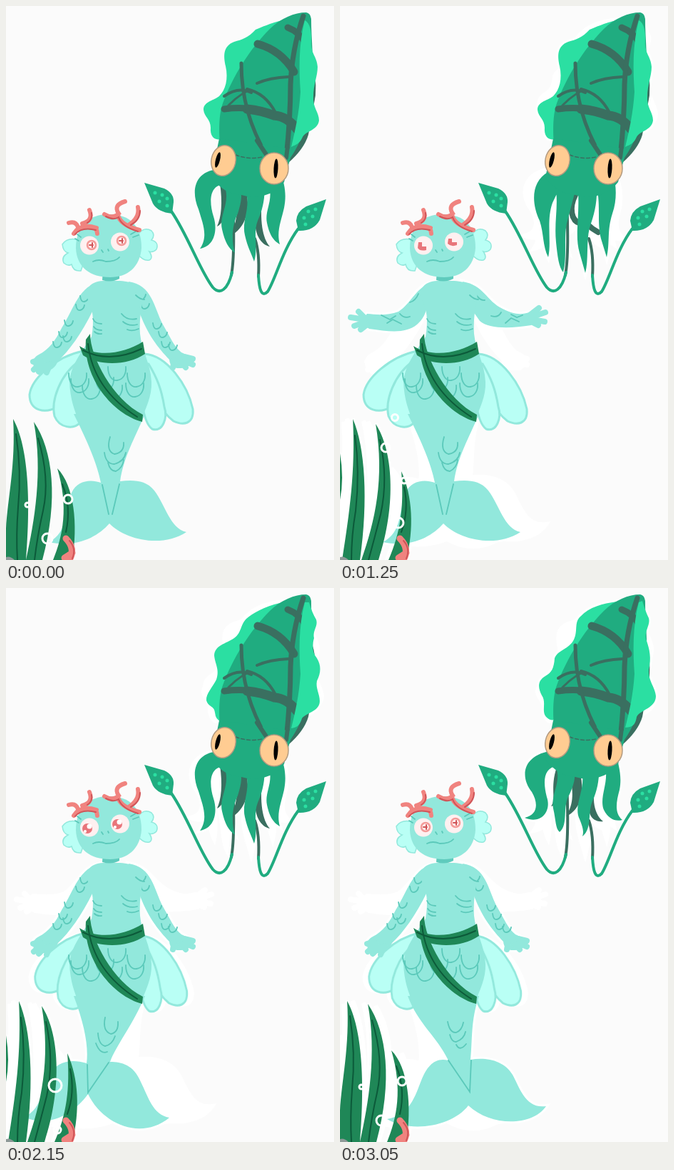
An HTML page without scripts for the animation above (3.1 s loop, 460 px wide and 774 px high).

```html
<!DOCTYPE html>
<html lang="en">
<head>
<meta charset="utf-8">
<title>Mermaid and squid</title>
<style>
html, body { margin: 0; width: 100%; height: 100%; overflow: hidden; background: #fbfbfb; }
svg { display: block; width: 460px; height: 774px; }
.skin { fill: #92e8dc; }
.film { fill: #b9fff5; stroke: #92e8dc; stroke-width: 3; }
.ear { fill: #b9fff5; stroke: #92e8dc; stroke-width: 1.5; }
.line { fill: none; stroke: #5bc9ba; stroke-width: 1.8; stroke-linecap: round; }
.finger { fill: none; stroke: #92e8dc; stroke-width: 8; stroke-linecap: round; }
.coral { fill: none; stroke: #f0837f; stroke-width: 6; stroke-linecap: round; }
.stalk { stroke-width: 9; }
.vein { fill: none; stroke: #d05558; stroke-width: 2; stroke-linecap: round; }
.weed { fill: #1f8757; }
.rib { fill: none; stroke: #0c5a3a; stroke-width: 2; stroke-linecap: round; }
.squid { fill: #20ac80; }
.frill { fill: #2bdfa2; }
.deep { fill: #3a6f60; }
.band { fill: none; stroke: #3a6f60; stroke-linecap: round; }
.ring { fill: none; stroke: #fff; stroke-width: 3; }

/* three cycles per loop; quick parts run twice per cycle */
.c { animation: calc(3.1s / 3) step-end infinite; }
.q { animation: calc(3.1s / 6) step-end infinite; }
.ghost { filter: brightness(0) invert(1); animation: trail 3.1s step-end infinite; }
@keyframes trail { 0% { opacity: 0 } 1.6% { opacity: 1 } }

.armDown { animation-name: armDown } .armUp { animation-name: armUp }
@keyframes armDown { 0%, 79% { opacity: 1 } 31% { opacity: 0 } }
@keyframes armUp { 0%, 79% { opacity: 0 } 31% { opacity: 1 } }

.legMid { animation-name: legMid } .legHang { animation-name: legHang } .legCurl { animation-name: legCurl }
@keyframes legMid { 0%, 55%, 97% { opacity: 1 } 29%, 80% { opacity: 0 } }
@keyframes legHang { 0%, 55% { opacity: 0 } 29% { opacity: 1 } }
@keyframes legCurl { 0%, 97% { opacity: 0 } 80% { opacity: 1 } }

.finA { animation-name: finA } .finB { animation-name: finB } .finC { animation-name: finC }
@keyframes finA { 0%, 13%, 46%, 78%, 98% { opacity: 1 } 4%, 36%, 62%, 86% { opacity: 0 } }
@keyframes finB { 0%, 78%, 98% { opacity: 0 } 62%, 86% { opacity: 1 } }
@keyframes finC { 0%, 13%, 46% { opacity: 0 } 4%, 36% { opacity: 1 } }

.weedMid { animation-name: weedMid } .weedLeft { animation-name: weedLeft } .weedRight { animation-name: weedRight }
@keyframes weedMid { 0%, 27%, 80% { opacity: 1 } 5%, 48% { opacity: 0 } }
@keyframes weedLeft { 0%, 80% { opacity: 0 } 48% { opacity: 1 } }
@keyframes weedRight { 0%, 27% { opacity: 0 } 5% { opacity: 1 } }

.tailMid { animation-name: tailMid } .tailRight { animation-name: tailRight } .tailLeft { animation-name: tailLeft }
@keyframes tailMid { 0%, 14%, 64%, 98% { opacity: 1 } 5%, 40%, 84% { opacity: 0 } }
@keyframes tailRight { 0%, 64%, 98% { opacity: 0 } 40%, 84% { opacity: 1 } }
@keyframes tailLeft { 0%, 14% { opacity: 0 } 5% { opacity: 1 } }

.hips { animation-name: hips }
@keyframes hips {
  0%, 14%, 38%, 60%, 78%, 98% { transform: none }
  4%, 27%, 48%, 68%, 88% { transform: translate(10px, 0) scale(.93, 1) }
}

.bubA { animation-name: bubA } .bubB { animation-name: bubB } .bubC { animation-name: bubC } .bubD { animation-name: bubD }
@keyframes bubA { 0%, 27%, 80% { opacity: 1 } 5%, 45% { opacity: 0 } }
@keyframes bubB { 0%, 14% { opacity: 0 } 5% { opacity: 1 } }
@keyframes bubC { 0%, 27%, 80% { opacity: 0 } 14%, 62% { opacity: 1 } }
@keyframes bubD { 0%, 62% { opacity: 0 } 45% { opacity: 1 } }

.eyeSoft { animation-name: eyeSoft } .eyeSide { animation-name: eyeSide } .eyeFull { animation-name: eyeFull }
@keyframes eyeSoft { 0%, 82% { opacity: 1 } 4% { opacity: 0 } }
@keyframes eyeSide { 0%, 27%, 82% { opacity: 0 } 15%, 62% { opacity: 1 } }
@keyframes eyeFull { 0%, 15%, 62% { opacity: 0 } 4%, 27% { opacity: 1 } }
</style>
</head>
<body>
<svg viewBox="0 0 460 774" xmlns="http://www.w3.org/2000/svg">
<defs>
  <path id="scale" class="line" d="M-13 0C-13 13-7 20 0 19 8 18 13 10 12 0"/>
  <path id="nick" class="line" d="M-6-3Q-5 6 0 5 5 4 6-2"/>

  <!-- squid side fins -->
  <g id="finA" class="frill">
    <path d="M388 20C370 24 358 30 350 33 340 44 331 47 320 50 304 56 305 70 308 84 312 102 308 117 299 126 289 133 277 134 277 145 278 155 287 158 287 170 286 182 292 188 301 186L350 100Z"/>
  </g>
  <g id="finB" class="frill">
    <path d="M388 19C368 22 350 26 337 40 328 48 334 60 328 72 321 86 306 86 301 98 300 112 297 118 288 123 276 130 278 140 283 150 290 160 282 172 289 180Q295 186 301 184L350 100Z"/>
  </g>
  <g id="finC" class="frill">
    <path d="M384 21C362 26 345 36 337 43 328 52 331 62 320 70 308 78 293 80 292 94 293 106 300 114 295 128 290 138 280 148 281 157 284 167 292 164 293 174Q294 184 301 186L350 100Z"/>
  </g>
  <path id="sideA" class="frill" d="M419 20C410 55 411 90 413 120 411 150 406 172 400 197 408 193 412 192 416 183 421 174 437 174 439 160 439 148 430 142 431 127 431 110 437 98 437 85 436 70 427 66 428 50Q429 25 419 20Z"/>
  <path id="sideB" class="frill" d="M419 20C410 55 411 90 413 120 411 150 406 172 400 195 408 194 414 194 416 180 421 170 443 168 443 151 442 138 432 130 433 114 437 98 434 85 430 74 425 62 436 52 433 42Q428 32 424 18Z"/>
  <path id="sideC" class="frill" d="M419 20C410 55 411 90 413 120 411 150 406 172 400 196 408 195 412 192 415 182 422 174 440 172 440 158 440 148 434 140 436 130 442 118 442 108 436 98 428 88 430 78 432 70 430 58 438 54 435 44Q429 34 425 20Z"/>

  <!-- squid arms -->
  <g id="legMid">
    <path class="deep" d="M300 248C304 275 302 295 296 308 309 302 314 275 316 255ZM322 260C327 290 322 304 315 321 336 310 343 285 337 260ZM360 262C355 300 360 325 370 336 358 334 346 318 350 290Z"/>
    <path class="squid" d="M302 228C266 228 258 256 270 284 276 304 284 322 272 339 293 336 297 312 291 294 284 272 286 250 306 249ZM306 250C316 275 298 292 303 312 307 330 312 338 321 345 315 324 318 305 325 290 330 275 331 265 329 258ZM336 258C344 282 330 300 335 320 339 338 344 345 348 357 354 338 346 318 353 300 360 284 364 268 362 248ZM366 246C378 268 362 285 366 303 370 322 376 328 384 333 379 315 386 300 390 282 394 262 390 248 386 235Z"/>
  </g>
  <g id="legHang">
    <path class="band" stroke-width="8" d="M330 264C321 282 324 300 337 304M347 305Q354 312 362 316"/>
    <path class="squid" d="M292 232C268 245 268 275 280 300 286 318 284 335 292 351 297 330 289 300 298 275L310 250ZM302 250C307 280 300 300 303 330 305 350 307 365 313 372 319 350 313 320 319 300L330 258ZM334 256C336 300 329 320 336 345L344 373C349 355 345 330 350 310 357 290 361 275 360 250ZM360 250C366 285 360 300 366 325L374 351C379 330 374 315 382 290 389 270 387 250 384 238Z"/>
  </g>
  <g id="legCurl">
    <path class="deep" d="M304 250C294 280 304 295 296 305 310 302 314 275 316 255ZM322 260C329 290 326 304 317 319 338 310 343 285 337 260ZM362 265C350 295 358 318 369 326 352 328 344 312 352 290Z"/>
    <path class="squid" d="M300 227C257 232 251 262 269 285 278 300 278 317 259 321 282 331 297 312 290 292 284 268 286 252 305 248ZM302 248C312 270 295 288 299 308 303 325 302 336 308 341 321 330 311 305 322 288 328 275 330 265 329 258ZM338 252C347 279 326 303 336 323 341 335 342 341 340 347 354 336 347 314 354 298 362 280 364 265 363 245ZM368 242C382 265 362 290 370 310 376 322 386 327 396 324 385 315 387 300 392 282 396 262 390 246 388 235Z"/>
  </g>
  <path id="head" class="squid" d="M299 185L402 200 390 246C375 266 350 270 330 264 312 263 300 254 288 240Z"/>

  <!-- mermaid hip fins -->
  <g id="hips" class="film">
    <path d="M108 482C70 490 36 520 33 543 33 566 55 570 72 560L98 520Z"/>
    <path d="M104 495C75 515 63 552 68 573 75 590 95 592 104 582L112 520Z"/>
    <path d="M194 486C226 488 255 530 262 563 264 585 248 586 235 580 215 565 198 530 194 500Z"/>
    <path d="M188 500C189 540 190 580 205 591 220 596 227 575 222 560 218 535 212 520 200 500Z"/>
  </g>

  <!-- tails -->
  <g id="tailMid">
    <path class="skin" d="M95 570C115 610 128 640 133 666 118 661 100 663 92 680 82 705 88 735 60 749 100 757 128 742 145 723 166 745 218 758 253 735 230 730 224 698 208 677 196 662 178 662 160 664 165 630 180 605 195 570Z"/>
    <path class="line" d="M135 669L144 710M159 668L149 710M146 602Q140 622 152 626 166 624 165 610M138 624Q140 640 152 640 166 636 168 624M143 638Q146 650 154 650 164 645 165 634"/>
  </g>
  <g id="tailRight">
    <path class="skin" d="M95 570C110 610 135 625 152 660 133 655 122 668 114 688 106 708 98 737 66 742 100 762 158 752 180 723 212 753 270 752 289 724 260 728 252 698 242 680 230 660 205 655 183 659 186 630 183 605 195 570Z"/>
    <path class="line" d="M152 660L182 704 184 660M151 606Q154 622 163 621 171 618 173 607M154 624Q157 635 163 634 174 630 176 620M163 638Q168 648 177 637"/>
  </g>
  <g id="tailLeft">
    <path class="skin" d="M95 570C110 610 116 640 113 664 90 657 70 662 60 682 50 705 48 730 25 739 60 755 95 735 115 707 136 750 190 772 229 740 206 736 200 712 189 690 179 666 162 662 146 662 154 640 178 610 195 570Z"/>
    <path class="line" d="M114 666L115 705 144 663M139 600Q135 619 147 623 158 621 157 606M129 622Q130 638 139 640 149 638 153 626M126 636Q132 652 142 648"/>
  </g>

  <!-- mermaid arms -->
  <g id="armDown">
    <path class="skin" d="M134 385C102 390 96 422 78 450 69 468 60 480 46 487 34 493 37 506 45 509 60 512 68 508 73 496 88 482 106 458 122 425Z"/>
    <path class="finger" d="M48 494L38 497M50 498L39 508M55 502L46 511M62 500L57 512"/>
    <path class="skin" d="M172 385C205 390 207 420 220 445 231 464 236 476 246 484 262 490 262 500 253 505 238 508 230 505 229 494 214 478 198 460 185 422Z"/>
    <path class="finger" d="M250 490L262 493M250 496L262 501M246 498L252 505M236 494L234 505"/>
    <use href="#nick" x="110" y="408"/><use href="#nick" x="104" y="420"/><use href="#nick" x="88" y="442"/><use href="#nick" x="80" y="458"/><use href="#nick" x="72" y="472"/><use href="#nick" x="86" y="464"/>
    <use href="#nick" x="190" y="405"/><use href="#nick" x="195" y="418"/><use href="#nick" x="212" y="446"/><use href="#nick" x="220" y="458"/><use href="#nick" x="224" y="472"/><use href="#nick" x="234" y="476"/>
  </g>
  <g id="armUp">
    <path class="skin" d="M134 385C107 390 101 415 82 427 66 433 50 431 38 430L27 442 41 451C70 455 92 458 108 445 116 438 121 430 124 412Z"/>
    <path class="finger" d="M36 437L26 427M34 438L15 435M34 442L20 447M38 445L29 452"/>
    <path class="skin" d="M172 385C202 390 205 412 228 423 245 432 255 431 266 428L278 436 268 446C238 451 208 451 196 440L182 420Z"/>
    <path class="finger" d="M266 432L279 422M270 434L288 428M270 438L287 441M266 440L278 446"/>
    <path class="line" d="M58 432L70 438 78 433M66 443L74 438 86 444M84 430Q90 437 98 434M110 402Q106 412 98 414M190 402Q196 412 203 411M226 428Q222 436 212 433M232 443L240 436 251 441M240 431L248 435 256 432"/>
  </g>

  <!-- weeds -->
  <g id="weedMid">
    <path class="weed" d="M10 577C26 605 37 665 28 774H0V730C2 690 14 640 10 577ZM39 581C66 620 74 690 51 774H28C40 720 52 650 39 581ZM72 646C96 670 101 725 93 774H66C80 740 88 700 72 646Z"/>
    <path class="rib" d="M14 598Q22 650 17 700 14 740 16 774M45 604Q62 660 52 705 44 740 40 774M79 668Q92 700 84 735"/>
  </g>
  <g id="weedLeft">
    <path class="weed" d="M5 581C20 625 30 690 27 774H2C2 710 9 650 5 581ZM33 580C68 625 76 690 54 774H28C41 710 48 645 33 580ZM87 650C102 685 104 730 94 774H68C86 735 91 700 87 650Z"/>
    <path class="rib" d="M8 606Q16 660 12 774M40 604Q56 660 50 705 44 740 40 774M91 672Q97 705 88 735"/>
  </g>
  <g id="weedRight">
    <path class="weed" d="M18 577C35 615 40 690 28 774H3C13 710 22 650 18 577ZM50 584C74 620 80 695 54 774H30C49 720 63 660 50 584ZM86 650C102 685 104 730 93 774H68C85 735 90 700 86 650ZM0 625Q6 660 0 690Z"/>
    <path class="rib" d="M21 600Q28 650 22 705 16 740 16 774M56 606Q68 660 57 710 48 745 40 774M90 672Q97 705 86 735"/>
  </g>
</defs>

<g class="ghost" stroke="#fff" stroke-width="6">
  <use href="#finA"/><use href="#finB"/><use href="#sideA"/><use href="#sideB"/>
  <use href="#legMid"/><use href="#legHang"/><use href="#legCurl"/>
  <use href="#hips"/><use href="#tailMid"/><use href="#tailRight"/><use href="#tailLeft"/>
  <use href="#armDown"/><use href="#armUp"/>
  <use href="#weedMid"/><use href="#weedLeft"/><use href="#weedRight"/>
</g>

<!-- squid -->
<g>
  <use href="#finA" class="c finA"/><use href="#finB" class="c finB"/><use href="#finC" class="c finC"/>
  <path class="deep" d="M428 75Q436 95 434 125L424 180Q418 200 396 219L395 150Z"/>
  <path class="squid" d="M421 9C405 9 385 17 370 32 342 60 318 98 304 136 297 155 299 185 301 205L397 215C415 190 428 155 430 120 432 80 428 45 428 18Q427 10 421 9Z"/>
  <g class="band">
    <path stroke-width="11" d="M353 53Q386 62 404 92"/>
    <path stroke-width="9" d="M395 30Q411 36 420 52M306 144Q345 139 374 152"/>
    <path stroke-width="7" d="M417 14Q401 60 399 110 399 155 393 212"/>
    <path stroke-width="13" d="M338 144Q358 146 376 153 394 154 408 172"/>
    <path stroke-width="5" d="M330 80Q330 150 366 209"/>
    <path stroke-width="4" d="M352 108Q370 100 396 99M306 126Q326 112 344 121M338 116Q364 122 378 149"/>
    <path stroke-width="3" d="M340 118Q320 128 306 146"/>
  </g>
  <use href="#sideA" class="c finA"/><use href="#sideB" class="c finB"/><use href="#sideC" class="c finC"/>
  <path class="band" stroke-width="4" d="M318 262C319 300 321 350 316 376M349 325Q356 345 354 378"/>
  <g fill="none" stroke="#20ac80" stroke-width="4" stroke-linecap="round">
    <path d="M232 287C255 320 272 370 290 393 300 404 311 397 317 372"/>
    <path d="M410 311C388 340 378 382 367 399 358 408 355 395 354 376"/>
  </g>
  <path class="squid" d="M194 247L222 255Q236 262 235 274L233 290Q213 288 206 276ZM449 270L421 280Q408 287 407 300L410 314Q431 315 440 299Z"/>
  <g class="frill">
    <circle cx="209" cy="261" r="2.5"/><circle cx="219" cy="264" r="2.5"/><circle cx="215" cy="273" r="2.5"/><circle cx="226" cy="269" r="2.5"/><circle cx="226" cy="279" r="2.5"/>
    <circle cx="434" cy="284" r="2.5"/><circle cx="424" cy="287" r="2.5"/><circle cx="430" cy="294" r="2.5"/><circle cx="418" cy="296" r="2.5"/><circle cx="420" cy="305" r="2.5"/>
  </g>
  <use href="#legMid" class="q legMid"/><use href="#legHang" class="q legHang"/><use href="#legCurl" class="q legCurl"/>
  <use href="#head"/>
  <path class="band" stroke-width="6" d="M395 196L393 212M352 188L366 209"/>
  <path class="band" stroke-width="1.5" stroke-dasharray="5 3" d="M322 208Q340 215 359 211"/>
  <g fill="#ffcc92" stroke="#b39b80" stroke-width="1.5">
    <ellipse cx="305" cy="216" rx="17" ry="21.5" transform="rotate(12 305 216)"/>
    <ellipse cx="376" cy="227" rx="20" ry="22"/>
  </g>
  <ellipse cx="297" cy="215" rx="3" ry="11" transform="rotate(14 297 215)"/>
  <ellipse cx="378.5" cy="227" rx="3" ry="13.5" transform="rotate(3 378 227)"/>
</g>

<!-- mermaid -->
<g>
  <use href="#hips" class="c hips"/>
  <use href="#tailMid" class="c tailMid"/><use href="#tailRight" class="c tailRight"/><use href="#tailLeft" class="c tailLeft"/>
  <use href="#armDown" class="q armDown"/><use href="#armUp" class="q armUp"/>
  <path class="skin" d="M136 384C118 385 110 396 114 408 122 424 124 438 120 462 110 478 91 500 89 525 90 550 96 565 103 582H188C196 562 205 545 204 525 203 500 190 480 188 458 187 440 189 425 192 410 196 392 178 385 160 384Z"/>
  <path fill="#5fcbbd" d="M136 368H159V381Q148 387 135 383Z"/>
  <g class="ear">
    <path d="M104 327Q86 322 79 333 80 343 87 345 77 350 81 359 87 364 92 361 94 371 105 370L112 350Z"/>
    <path d="M186 318Q194 308 204 314 210 320 204 327 215 330 211 340 206 345 201 343 207 352 201 355 193 357 184 346Z"/>
  </g>
  <path class="skin" d="M144 291C175 291 190 308 190 338 188 365 170 379 146 379 118 379 99 365 98 338 98 308 115 291 144 291Z"/>
  <path class="line" d="M122 357Q130 353 140 357 154 357 159 351M134 341l2 3M143 340l1 2M102 328L97 325M105 323L100 319M175 319L182 315M178 323L186 320M123 448Q126 453 134 453M122 437Q125 444 134 444M162 430Q170 440 183 437M164 441Q172 448 184 445M124 455Q128 459 134 458M170 452Q177 455 186 451M182 404Q188 410 194 410"/>
  <g fill="#fff0f0">
    <circle cx="117" cy="334.5" r="13"/><circle cx="160" cy="329.5" r="13"/>
  </g>
  <g class="c eyeSoft">
    <g fill="none" stroke="#f39a98" stroke-width="2.5"><circle cx="120" cy="334" r="6"/><circle cx="162" cy="328" r="6"/></g>
    <path class="vein" d="M117 334h5M121 331v6M159 328h5M163 325v6"/>
  </g>
  <g class="c eyeSide">
    <path fill="#e8757a" d="M110 330h5v6h6v5q-9 2-12-3ZM152 325h5v5h7v4q-8 3-13-2Z"/>
  </g>
  <g class="c eyeFull">
    <g fill="#e8757a"><circle cx="114" cy="336" r="7"/><circle cx="156" cy="330" r="7"/></g>
    <g fill="#fff"><circle cx="117" cy="333" r="3.5"/><circle cx="111" cy="340" r="2"/><circle cx="159" cy="327" r="3.5"/><circle cx="153" cy="334" r="2"/></g>
  </g>
  <path class="coral" d="M95 318Q104 303 127 310M101 309Q98 300 88 303M107 304Q123 300 117 285M120 309Q128 310 128 318M138 291Q150 298 158 290 150 278 167 273M157 292Q160 306 187 313M172 306Q188 296 185 281"/>
  <path class="vein" d="M97 319Q106 308 126 313M140 294Q151 300 158 295 162 308 185 315M114 303Q122 298 120 289M175 306Q188 299 188 286"/>
  <use href="#scale" x="101" y="513"/><use href="#scale" x="120" y="530"/><use href="#scale" x="156" y="504"/><use href="#scale" x="183" y="513"/><use href="#scale" x="139" y="519"/><use href="#scale" x="151" y="530"/><use href="#scale" x="181" y="527"/><use href="#scale" x="104" y="521"/>
  <path class="weed" d="M103 475C130 492 166 485 192 469L195 486C170 503 130 503 108 488Z"/>
  <path class="weed" d="M118 458C118 490 150 550 192 571L191 581C150 570 108 520 112 466Z"/>
  <path class="rib" d="M108 481Q145 500 190 479M115 472Q122 535 184 574"/>
</g>

<!-- weeds and bubbles -->
<use href="#weedMid" class="c weedMid"/><use href="#weedLeft" class="c weedLeft"/><use href="#weedRight" class="c weedRight"/>
<path class="coral stalk" d="M84 744Q98 758 89 774M93 764L82 771"/>
<path class="vein" d="M89 747Q99 758 93 772"/>
<path fill="#8e9a98" d="M0 770Q6 768 12 774H0Z"/>
<g class="ring">
  <g class="c bubA"><circle cx="87" cy="689" r="6"/><circle cx="58" cy="744" r="7"/><circle cx="30" cy="697" r="3"/></g>
  <g class="c bubB"><circle cx="69" cy="695" r="9"/><circle cx="72" cy="757" r="5"/></g>
  <g class="c bubC"><circle cx="82" cy="722" r="7"/><circle cx="77" cy="575" r="4.5"/><circle cx="64" cy="617" r="6"/><circle cx="90" cy="663" r="4"/></g>
  <g class="c bubD"><ellipse cx="42" cy="638" rx="4.5" ry="6.5"/><circle cx="73" cy="757" r="5"/><circle cx="65" cy="696" r="6"/></g>
</g>
</svg>
</body>
</html>
```
